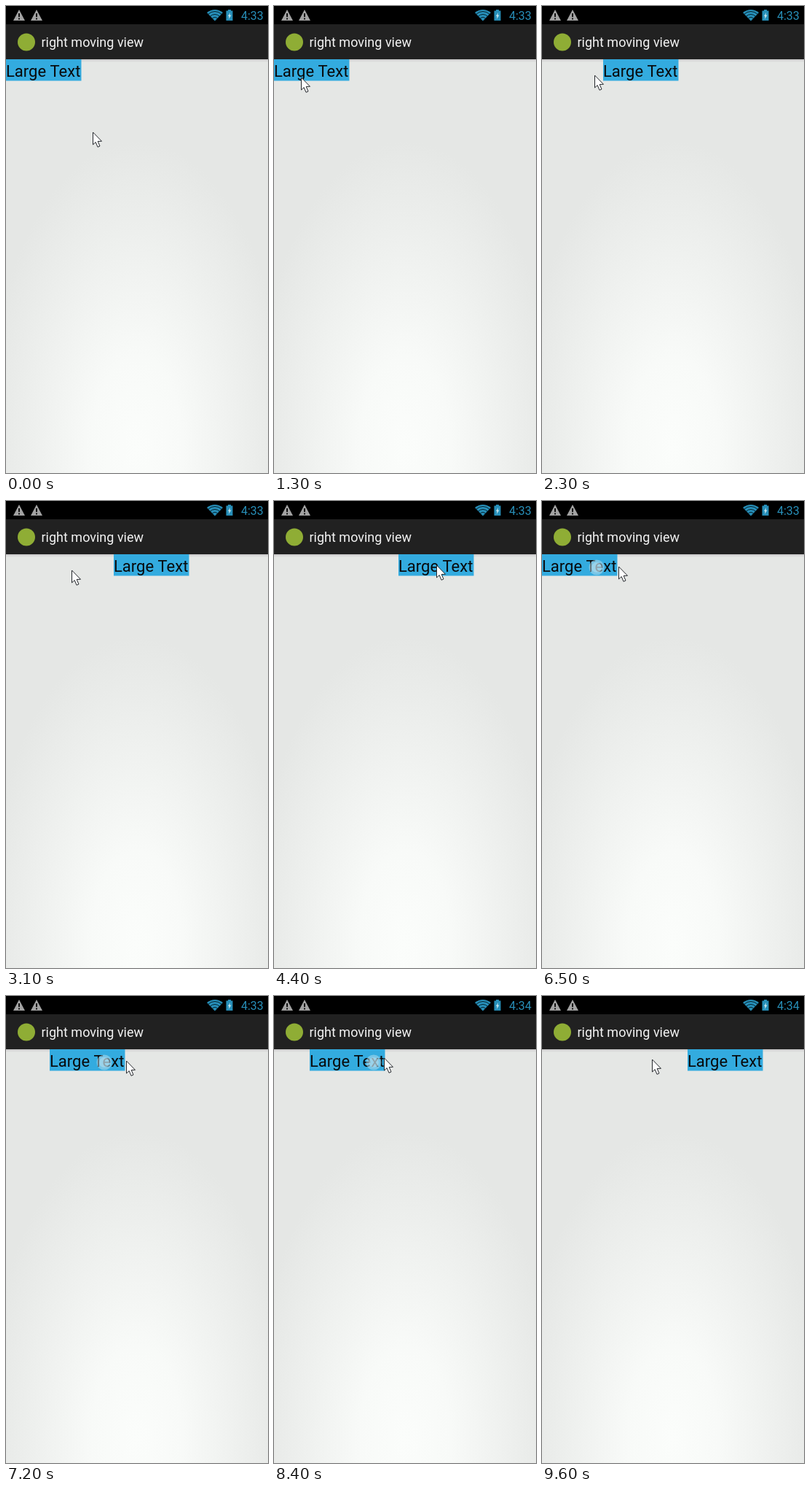
An HTML page with a canvas that plays this animation: 360x640 px, repeating every 9.7 s.

```html
<!DOCTYPE html>
<html lang="en">
<head>
<meta charset="utf-8">
<title>right moving view</title>
<style>
html, body { margin: 0; width: 100%; height: 100%; overflow: hidden; background: #000; }
canvas { display: block; width: 360px; height: 640px; }
</style>
</head>
<body>
<canvas id="stage" width="360" height="640"></canvas>
<script>
const ctx = document.getElementById('stage').getContext('2d');
const LOOP = 9700, STEP = 100;
const BLUE = '#278fb9';

// Smooth progress from 0 to 1 between two times.
function ease(t, start, end) {
  const k = Math.max(0, Math.min(1, (t - start) / (end - start)));
  return k * k * (3 - 2 * k);
}

// Two pushes right, one pull back, a shake and a long push.
function labelX(t) {
  const pushes = 84 * ease(t, 1500, 2000) + 87 * ease(t, 2700, 3300);
  const pull = 171 * ease(t, 4500, 5200);
  const last = 42 * ease(t, 6500, 7100) + 158 * ease(t, 8500, 9200);
  const shake = 28 * ease(t, 6700, 7200) * (1 - ease(t, 8500, 9000));
  return Math.round(pushes - pull + last + shake * Math.sin((t - 7057) / 205.5));
}

// The pointer keeps its grip on the label, and lets go between drags.
function cursorAt(t) {
  const grip = 119 - 85 * ease(t, 500, 1400) - 92 * ease(t, 2000, 2600)
    + 110 * ease(t, 3400, 4400) - 2 * ease(t, 4500, 5200)
    + 55 * ease(t, 5500, 6400) - 3 * ease(t, 7200, 8400)
    - 151 * ease(t, 9200, 9400);
  const y = 172 - 78 * ease(t, 500, 1400) - 7 * ease(t, 3400, 4400)
    + 2 * ease(t, 4500, 5200) - 5 * ease(t, 6700, 8400) + 2 * ease(t, 9000, 9400)
    + 40 * Math.sin(Math.PI * ease(t, 9100, 9400));
  return [labelX(t) + grip, y].map(Math.round);
}

function rect(x, y, w, h, fill) {
  ctx.fillStyle = fill;
  ctx.fillRect(x, y, w, h);
}

function disc(x, y, r, fill) {
  ctx.fillStyle = fill;
  ctx.beginPath();
  ctx.arc(x, y, r, 0, Math.PI * 2);
  ctx.fill();
}

function poly(points, fill, stroke) {
  ctx.beginPath();
  points.forEach(([x, y]) => ctx.lineTo(x, y));
  ctx.closePath();
  ctx.fillStyle = fill;
  ctx.fill();
  if (stroke) {
    ctx.strokeStyle = stroke;
    ctx.stroke();
  }
}

function text(str, x, y, size, fill) {
  ctx.font = size + 'px Roboto, sans-serif';
  ctx.fillStyle = fill;
  ctx.fillText(str, x, y);
}

function background() {
  ctx.save();
  ctx.translate(180, 605);
  ctx.scale(0.5, 1);
  const glow = ctx.createRadialGradient(0, 0, 0, 0, 0, 420);
  glow.addColorStop(0, '#fbfdfb');
  glow.addColorStop(0.3, '#f8faf8');
  glow.addColorStop(1, '#e5e7e5');
  rect(-360, -605, 720, 640, glow);
  ctx.restore();
  const shade = ctx.createLinearGradient(0, 73, 0, 77);
  shade.addColorStop(0, 'rgba(40,20,40,.15)');
  shade.addColorStop(1, 'rgba(40,20,40,0)');
  rect(0, 73, 360, 4, shade);
}

function warning(x) {
  poly([[x, 5], [x + 8, 20], [x - 8, 20]], '#a2a2a2');
  rect(x - 1, 10, 2, 5, '#111');
  rect(x - 1, 16.5, 2, 2, '#111');
}

function wifi() {
  ctx.save();
  ctx.beginPath();
  ctx.moveTo(287, 20.5);
  ctx.lineTo(276, 9);
  ctx.quadraticCurveTo(287, 1, 298, 9);
  ctx.closePath();
  ctx.clip();
  rect(274, 3, 26, 18, BLUE);
  ctx.strokeStyle = '#03202b';
  for (let r = 5; r < 14; r += 4) {
    ctx.beginPath();
    ctx.arc(287, 20.5, r, Math.PI, 0);
    ctx.stroke();
  }
  ctx.restore();
}

function battery() {
  rect(305, 5, 4, 2, BLUE);
  rect(302.5, 6.5, 9, 13.5, BLUE);
  poly([[308, 9], [305, 14], [306.5, 14], [306, 18], [309.5, 12.5], [307.5, 12.5]], '#c4e4ee');
}

function bars(t) {
  rect(0, 0, 360, 25, '#000');
  rect(0, 25, 360, 48, '#212121');
  warning(18);
  warning(42);
  wifi();
  battery();
  text(t < 7300 ? '4:33' : '4:34', 323, 18.5, 16, BLUE);
  disc(28, 49.5, 12, '#8fad35');
  text('right moving view', 48.5, 56, 18, '#f3f3f3');
}

function label(x) {
  rect(x, 73, 103.5, 29.5, '#33abdf');
  text('Large Text', x, 97, 22, '#080a0c');
}

function touch(t) {
  const x = labelX(t) + 75 + 13 * ease(t, 7200, 8400);
  disc(x, 91, 10.5, 'rgba(190,225,240,.5)');
  disc(x, 91, 7, 'rgba(205,230,240,.4)');
}

function cursor([x, y]) {
  const shape = [[0.5, 1], [0.5, 18], [4.2, 14.6], [7, 21.3], [10, 20], [7.2, 13.5], [12.5, 13.3]];
  poly(shape.map(([dx, dy]) => [x + dx, y + dy]), '#fff', '#25282d');
}

function draw(now) {
  const t = Math.floor((now % LOOP) / STEP) * STEP;
  background();
  bars(t);
  label(labelX(t));
  if (t >= 6500 && t < 9200) touch(t);
  cursor(cursorAt(t));
}

const start = performance.now();
function tick() {
  draw(performance.now() - start);
  requestAnimationFrame(tick);
}
tick();
</script>
</body>
</html>
```
